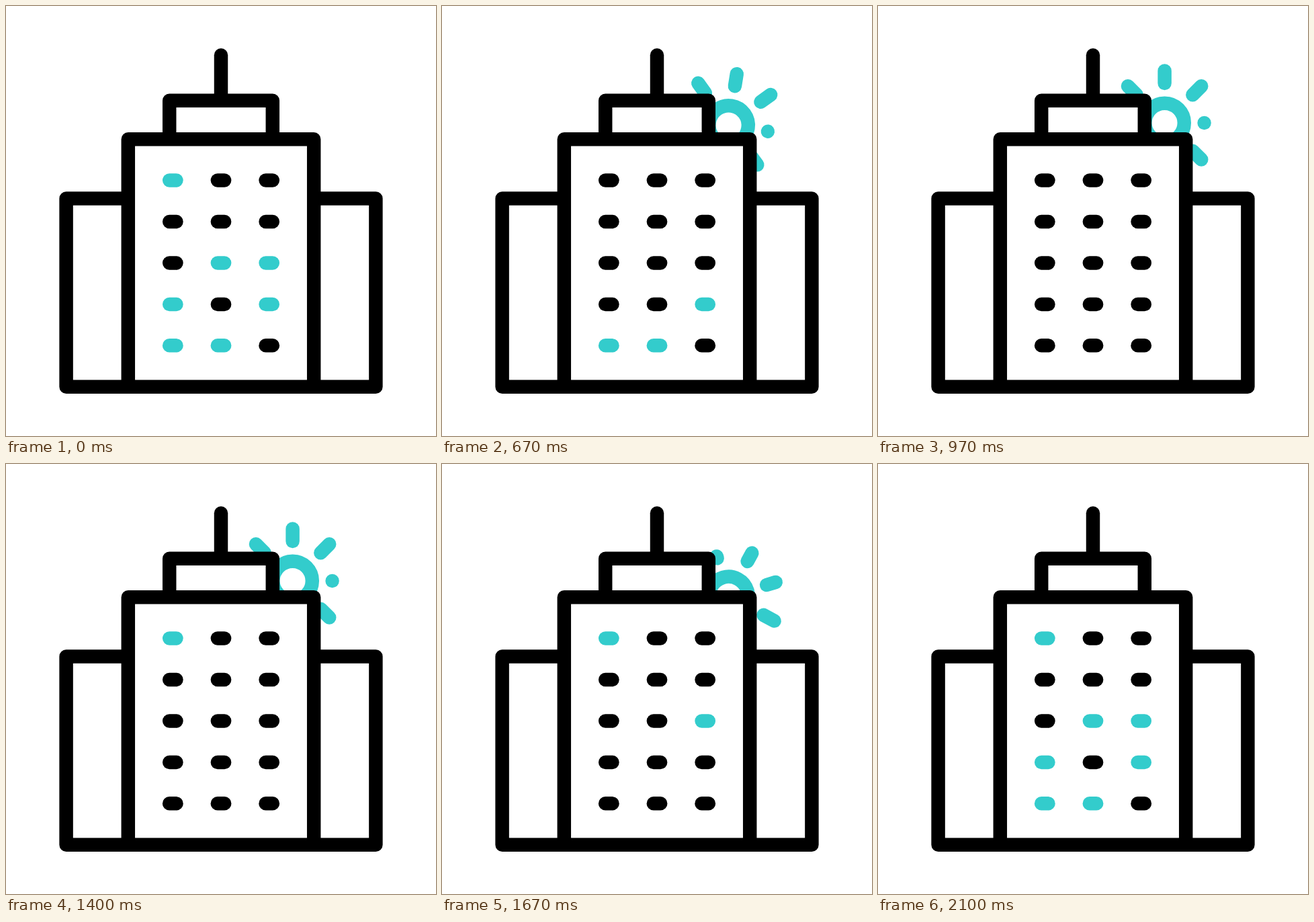
An HTML page that plays this animation: 640 by 640 pixels, repeating every 2.5 s.

```html
<!DOCTYPE html>
<html lang="en">
<head>
<meta charset="utf-8">
<title>Sunrise behind an office block</title>
<style>
  html, body { margin: 0; width: 100%; height: 100%; overflow: hidden; background: #fff; }
  svg { display: block; width: 100%; height: 100%; }
  svg * { stroke-width: 20.48; stroke-linecap: round; stroke-linejoin: round; }
  #sun { fill: none; stroke: #33cccc; }
  #building { fill: #fff; stroke: #000; }
</style>
</head>
<body>
<svg viewBox="0 0 640 640">
  <g id="sun"><circle r="29.2"/></g>
  <g id="building">
    <path d="M320 73.3V140"/>
    <path d="M243.2 140.8H396.8V198.2H243.2Z"/>
    <path d="M89.6 286.4H550.4V566.7H89.6Z"/>
    <path d="M181.8 198.2H458.2V566.7H181.8Z"/>
  </g>
  <g id="windows"></g>
</svg>
<script>
const LOOP = 2500, FRAME = 100 / 3;
const TEAL = '#33cccc';
const INNER = 59, FULL = 18.3;

// Windows that switch: "row,column": [off, on] in ms
const SWITCHES = {
  '0,0': [400, 1400],
  '2,2': [400, 1600],
  '2,1': [530, 2100],
  '3,0': [630, 1930],
  '4,0': [770, 1830],
  '4,1': [870, 1730],
  '3,2': [970, 1870]
};

// Rays: rest angle and steps of [ms, length]
const RAYS = [
  [-135, [[530, 0], [650, FULL], [1530, FULL], [1667, 3], [1710, 0]]],
  [-90, [[540, 0], [667, FULL], [1500, FULL], [1533, 17.9], [1667, 14], [1800, 0]]],
  [-45, [[570, 0], [633, 12], [667, FULL], [1530, FULL], [1667, 14.2], [1733, 9], [1800, 0]]],
  [0, [[1533, 0], [1633, 15], [1667, FULL]]],
  [45, [[580, 0], [667, 13.8], [715, FULL]]]
];

const sun = document.getElementById('sun');
const windowsGroup = document.getElementById('windows');

function add(parent, tag, attrs) {
  const el = document.createElementNS('http://www.w3.org/2000/svg', tag);
  for (const name in attrs) el.setAttribute(name, attrs[name]);
  return parent.appendChild(el);
}

const rays = RAYS.map(([angle, steps]) => ({
  steps,
  el: add(sun, 'line', { x1: INNER, x2: INNER + FULL, transform: `rotate(${angle})` })
}));

const lights = [];
for (let row = 0; row < 5; row++) {
  for (let col = 0; col < 3; col++) {
    const x = 243.2 + col * 71.68, y = 259.6 + row * 61.44;
    const el = add(windowsGroup, 'path', { d: `M${x} ${y}h10.24`, stroke: '#000' });
    const times = SWITCHES[row + ',' + col];
    if (times) lights.push({ el, off: times[0], on: times[1] });
  }
}

function lookup(steps, t) {
  if (t <= steps[0][0]) return steps[0][1];
  for (let i = 1; i < steps.length; i++) {
    const [t0, a] = steps[i - 1], [t1, b] = steps[i];
    if (t < t1) return a + (b - a) * (t - t0) / (t1 - t0);
  }
  return steps[steps.length - 1][1];
}

// Vertical drop and turn of the sun from its resting pose
function sunPose(t) {
  if (t < 1000) {
    const left = end => Math.max(0, end - t);
    return [3.5 * (left(800) / 133) ** 4.4, 9 * (left(830) / 163) ** 3.3];
  }
  const fall = Math.max(0, t - 1400) / 133.3;
  return [5.5 * fall ** 2.06, 5.6 * fall ** 2.34];
}

function draw(now) {
  const t = Math.floor((now % LOOP + 4) / FRAME) * FRAME;
  const [drop, turn] = sunPose(t);
  sun.setAttribute('visibility', t > 530 && t < 1840 ? 'visible' : 'hidden');
  sun.setAttribute('transform', `translate(426.6 ${173.9 + drop}) rotate(${turn})`);
  for (const { el, steps } of rays) el.setAttribute('x2', INNER + lookup(steps, t));
  for (const { el, off, on } of lights) {
    el.setAttribute('stroke', t + 5 < off || t + 5 >= on ? TEAL : '#000');
  }
}

let start;
function tick(now) {
  start ??= now;
  draw(now - start);
  requestAnimationFrame(tick);
}
draw(0);
requestAnimationFrame(tick);
</script>
</body>
</html>
```
